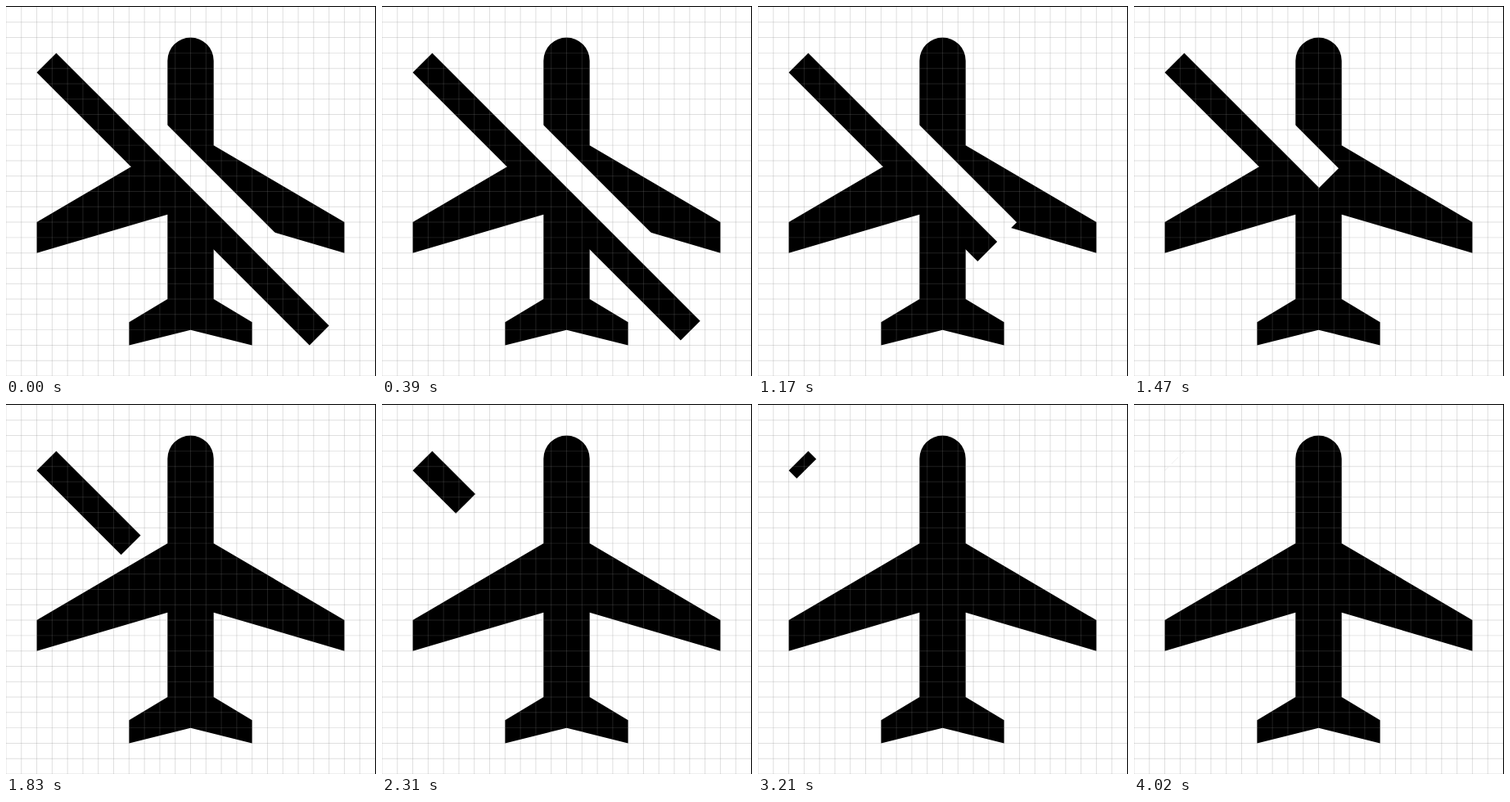
Animation of 452x452 px, one loop 4120 ms. Source, as an HTML page without scripts:

```html
<!DOCTYPE html>
<html lang="en">
<head>
<meta charset="utf-8">
<title>Airplane mode</title>
<style>
  @property --t {
    syntax: "<number>";
    inherits: true;
    initial-value: 0;
  }

  html, body {
    margin: 0;
    width: 100%;
    height: 100%;
    overflow: hidden;
    background: #000;
  }

  svg {
    position: absolute;
    left: 0;
    top: 1px;
    width: 451px;
    height: 451px;
    background: #fff;
  }

  .grid {
    fill: none;
    stroke: #808080;
    stroke-opacity: .25;
    stroke-width: 24;
    stroke-dasharray: .053 .947;
    stroke-dashoffset: .0265;
  }

  .slash { animation: retract 4120ms infinite; }

  @keyframes retract {
    0%, 1.2% { transform: scaleX(1); animation-timing-function: cubic-bezier(.4, 0, .2, 1); }
    99%, 100% { transform: scaleX(0); }
  }

  /* Same curve, cubic-bezier(.4, 0, .2, 1), solved in closed form and sampled every 30 ms */
  @supports (scale: pow(2, 2)) {
    .slash {
      --x: clamp(0, (var(--t) * 30 - 50) / 4030, 1);
      --h: (.087890625 - .3125 * var(--x));
      --r: sqrt(var(--h) * var(--h) + .00130844);
      --s: (.375 + pow(var(--r) - var(--h), 1 / 3) - pow(var(--r) + var(--h), 1 / 3));
      transform: scaleX(calc(1 - var(--s) * var(--s) * (3 - 2 * var(--s))));
      animation: tick 4120ms -2ms infinite;
    }
  }

  @keyframes tick {
    0% { --t: 0; animation-timing-function: steps(134, end); }
    97.5728%, 100% { --t: 134; }
  }
</style>
</head>
<body>
<svg viewBox="0 0 24 24">
  <path d="M10.5 3.5a1.5 1.5 0 0 1 3 0V9L22 14v2l-8.5-2.5V19l2.5 1.5V22l-4-1-4 1v-1.5l2.5-1.5v-5.5L2 16v-2l8.5-5z"/>
  <g transform="translate(3.27 3) rotate(45)">
    <g class="slash">
      <rect y="-1.796" width="25.074" height="1.9" fill="#fff"/>
      <rect width="25.074" height="1.796"/>
    </g>
  </g>
  <path class="grid" d="M0 12H24"/>
  <path class="grid" d="M12 0V24"/>
</svg>
</body>
</html>
```
